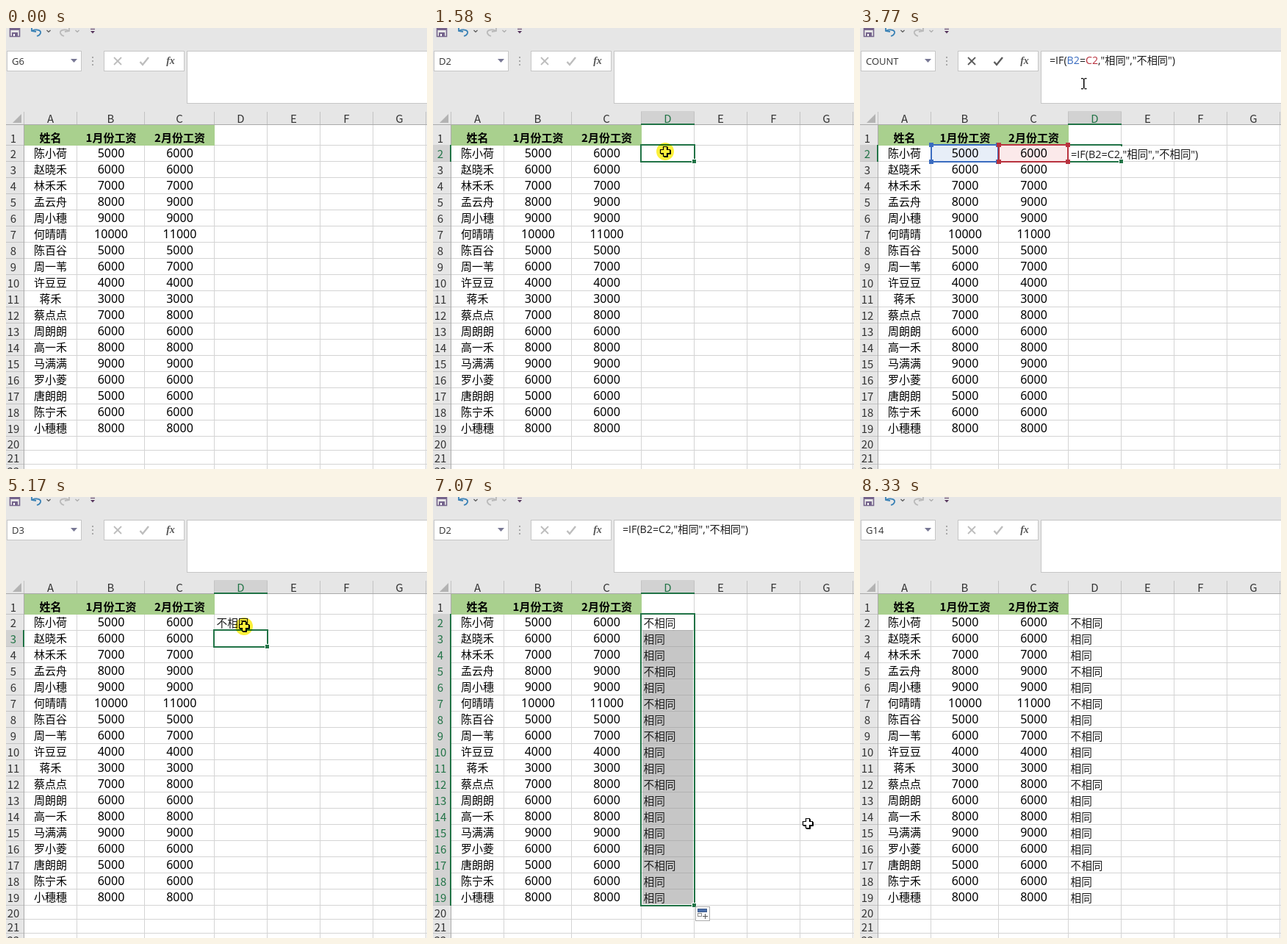
Write an HTML page with a canvas that moves like this. It is 573 by 600 pixels and loops after 8400 ms.

```html
<!DOCTYPE html>
<html lang="zh-CN">
<head>
<meta charset="utf-8">
<title>IF 比较两列</title>
<style>
html, body { margin: 0; width: 100%; height: 100%; overflow: hidden; background: #e6e6e6; }
canvas { display: block; }
</style>
</head>
<body>
<canvas id="stage" width="573" height="600"></canvas>
<script>
const ctx = document.getElementById('stage').getContext('2d');
const LOOP = 8400;
const GREEN = '#217346', BLUE = '#3a6cc0', RED = '#b8323e', INK = '#1c1c1c';
const CJK = '"Noto Sans CJK SC","Noto Sans CJK JP","Noto Sans CJK",sans-serif';
const LATIN = '"Open Sans","Noto Sans",' + CJK;

const colX = [24, 96, 188, 283, 355, 427, 499, 571];
const names = ['陈小荷', '赵晓禾', '林禾禾', '孟云舟', '周小穗', '何晴晴', '陈百谷', '周一苇', '许豆豆',
  '蒋禾', '蔡点点', '周朗朗', '高一禾', '马满满', '罗小菱', '唐朗朗', '陈宁禾', '小穗穗'];
const jan = [5, 6, 7, 8, 9, 10, 5, 6, 4, 3, 7, 6, 8, 9, 6, 5, 6, 8];
const feb = [6, 6, 7, 9, 9, 11, 5, 7, 4, 3, 8, 6, 8, 9, 6, 6, 6, 8];
const formula = [['=IF(', INK], ['B2', BLUE], ['=', INK], ['C2', RED], [',"相同","不相同")', INK]];

// Pointer paths: start, end, steps, points
const moves = [
  [70, 540, 7, [[390.5, 424], [324, 150]]],
  [860, 860, 1, [[316, 168], [316, 168]]],
  [1810, 2290, 7, [[316, 168], [304, 75]]],
  [4700, 5010, 5, [[304, 75], [316, 130], [326, 193], [324, 176]]],
  [5480, 5790, 5, [[324, 176], [340, 184], [359, 195], [355, 183]]],
  [6580, 7000, 6, [[355, 183], [510, 444]]],
  [7470, 8010, 8, [[510, 444], [400, 300], [297, 203], [460, 440], [638, 734]]]
];
const clicks = [860, 1580, 1740, 2450, 5170, 6190, 6350, 7220];

const within = (t, a, b) => t >= a && t < b;
const rowTop = r => r === 1 ? 131 : r <= 20 ? 159 + 22 * (r - 2) : 555 + 19 * (r - 20);

function box(x, y, w, h, color) {
  ctx.fillStyle = color;
  ctx.fillRect(x, y, w, h);
}

function frame(x, y, w, h, fill, line) {
  box(x, y, w, h, line);
  box(x + 1, y + 1, w - 2, h - 2, fill);
}

function text(str, x, y, font, color = '#000', align = 'center') {
  ctx.font = font;
  ctx.fillStyle = color;
  ctx.textAlign = align;
  ctx.fillText(str, x, y);
}

function shape(points, fill, line, width = 1) {
  ctx.beginPath();
  points.forEach(p => ctx.lineTo(p[0], p[1]));
  ctx.closePath();
  if (fill) { ctx.fillStyle = fill; ctx.fill(); }
  if (line) { ctx.strokeStyle = line; ctx.lineWidth = width; ctx.stroke(); }
}

function stroke(points, color, width) {
  ctx.beginPath();
  points.forEach(p => ctx.lineTo(p[0], p[1]));
  ctx.strokeStyle = color;
  ctx.lineWidth = width;
  ctx.stroke();
}

function stateAt(t) {
  const s = { name: 'G6', sel: null };
  if (t >= 860) s.sel = [6, 6, 6];
  if (t >= 1580) { s.name = 'D2'; s.sel = [3, 2, 2]; }
  s.edit = within(t, 1740, 4150);
  s.noUndo = within(t, 1740, 3230);
  s.typed = within(t, 3230, 4150);
  if (s.typed) s.name = 'COUNT';
  if (t >= 4150) { s.name = 'D3'; s.sel = [3, 3, 3]; s.results = 1; }
  if (t >= 5250) { s.name = 'D2'; s.sel = [3, 2, 2]; }
  if (t >= 6430) { s.sel = [3, 2, 19]; s.results = 18; }
  if (t >= 7220) { s.name = 'G14'; s.sel = [6, 14, 14]; }
  if (t >= 8330) s.sel = null;
  s.formula = s.typed || within(t, 5250, 7220);
  s.options = within(t, 6430, 8330);
  return s;
}

function curvedArrow(x, dir, color) {
  ctx.save();
  ctx.translate(x, 0);
  ctx.scale(dir, 1);
  ctx.beginPath();
  ctx.moveTo(-5, 3.5);
  ctx.bezierCurveTo(1, 1, 7, 3, 6, 7);
  ctx.quadraticCurveTo(5, 10, 1, 11);
  ctx.strokeStyle = color;
  ctx.lineWidth = 1.8;
  ctx.stroke();
  stroke([[-6, -2], [-6, 4], [0, 5]], color, 1.8);
  ctx.restore();
}

function toolbar(s) {
  box(0, 0, 573, 113, '#e6e6e6');
  const plum = '#75648c';
  stroke([[5.5, 0], [5.5, 11.5], [18.5, 11.5], [18.5, 0]], plum, 1.6);
  box(6, 0, 12, 3, plum);
  box(8, 6, 8, 6, plum);
  box(10, 8, 2, 3, '#fff');
  curvedArrow(41, 1, s.noUndo ? '#b3b3b3' : '#3981b5');
  curvedArrow(80, -1, '#b9b9b9');
  stroke([[55.5, 3], [58, 5.5], [60.5, 3]], s.noUndo ? '#aaa' : '#555', 1.2);
  stroke([[94.5, 3], [97, 5.5], [99.5, 3]], '#aaa', 1.2);
  box(115, 1, 6, 1, '#5a3a60');
  shape([[115, 4], [121, 4], [118, 7.5]], '#5a3a60');

  const edge = '#c6c6c6';
  frame(1, 31, 102, 28, '#fff', edge);
  text(s.name, 8, 50, '13px ' + LATIN, '#333', 'left');
  shape([[88, 42], [97, 42], [92.5, 47]], '#777794');
  [40, 45, 50].forEach(y => box(117, y - 1, 2, 2, '#a6a6a6'));
  frame(133, 31, 110, 28, '#fff', edge);
  const mark = s.edit ? '#5c5c5c' : '#bdbdbd';
  stroke([[147, 40], [157, 50]], mark, 1.8);
  stroke([[157, 40], [147, 50]], mark, 1.8);
  stroke([[182.5, 46], [186, 50], [194, 40]], mark, 2.4);
  text('fx', 224, 49, 'italic bold 14px "Liberation Serif",serif', '#555');
  frame(246, 31, 330, 72, '#fff', edge);

  if (s.formula) {
    let x = 258;
    formula.forEach(([part, color]) => {
      text(part, x, 49, '14.2px ' + LATIN, s.typed ? color : INK, 'left');
      x += ctx.measureText(part).width;
    });
  }
}

function headers(s) {
  const font = '15px ' + CJK, edge = '#c3c3c3';
  box(0, 113, 573, 19, '#e6e6e6');
  box(0, 131, 24, 469, '#e6e6e6');
  for (let c = 0; c < 7; c++) {
    const x = colX[c], w = colX[c + 1] - x, on = s.sel && s.sel[0] === c;
    if (on) box(x, 113, w + 1, 18, '#d2d2d2');
    box(x, 114, 1, 17, edge);
    text('ABCDEFG'[c], x + w / 2 + .5, 129, font, on ? GREEN : '#333');
  }
  box(571, 114, 1, 17, edge);
  box(0, 131, 573, 1, '#aaa');
  for (let r = 1; r <= 22; r++) {
    const y = rowTop(r), h = rowTop(r + 1) - y;
    const on = s.sel && r >= s.sel[1] && r <= s.sel[2];
    if (on) box(0, y, 24, h, '#d2d2d2');
    box(0, y + h, 24, 1, edge);
    text(r, 10, r === 1 ? 156 : y + (r > 21 ? 16 : r > 19 ? 17 : 18), font, on ? GREEN : '#333');
  }
  box(24, 131, 1, 469, '#aaa');
  if (s.sel) {
    const [c, a, b] = s.sel;
    box(colX[c], 130, colX[c + 1] - colX[c] + 1, 2, GREEN);
    box(23, rowTop(a), 2, rowTop(b + 1) - rowTop(a) + 1, GREEN);
  }
  shape([[21, 117], [21, 129], [9, 129]], '#b3b3b3');
}

function sheet(s) {
  const grid = '#d4d4d4', multi = s.sel && s.sel[2] > s.sel[1];
  box(24, 131, 549, 469, '#fff');
  if (multi) box(285, 182, 69, 372, '#c6c6c6');
  for (let r = 2; r <= 22; r++) box(25, rowTop(r), 548, 1, grid);
  colX.slice(1).forEach(x => box(x, 132, 1, 468, grid));
  if (multi) for (let r = 3; r < 20; r++) box(285, rowTop(r), 69, 1, '#b2b2b2');
  box(25, 132, 259, 28, '#a9d08e');
  if (s.typed) {
    box(97, 160, 91, 21, '#e7eef8');
    box(189, 160, 94, 21, '#fbe9ea');
  }

  const mid = [60.5, 143, 236.5];
  ['姓名', '1月份工资', '2月份工资'].forEach((h, i) => text(h, mid[i], 155, 'bold 15px ' + CJK));
  names.forEach((name, i) => {
    const y = rowTop(i + 2) + 17;
    text(name, mid[0], y, '15px ' + CJK);
    text(jan[i] * 1000, mid[1], y, '16px "Noto Sans",' + LATIN);
    text(feb[i] * 1000, mid[2], y, '16px "Noto Sans",' + LATIN);
    if (i < s.results) text(jan[i] === feb[i] ? '相同' : '不相同', 286.5, y + 1, '14.67px ' + CJK, INK, 'left');
  });
}

function handles(x, y, w, h, color) {
  ctx.strokeStyle = color;
  ctx.lineWidth = 2;
  ctx.strokeRect(x, y, w, h);
  [x, x + w].forEach(px => [y, y + h].forEach(py => box(px - 3, py - 3, 6, 6, color)));
}

function selection(s) {
  if (!s.sel) return;
  const [c, a, b] = s.sel;
  const x = colX[c], y = rowTop(a), r = colX[c + 1] + 1, bottom = rowTop(b + 1) + 1;
  ctx.strokeStyle = GREEN;
  ctx.lineWidth = 2;
  ctx.strokeRect(x, y, r - x, bottom - y);
  if (s.typed) {
    box(285, 161, 177, 20, '#fff');
    text(formula.map(f => f[0]).join(''), 287, 176.5, '14.4px ' + LATIN, INK, 'left');
    handles(97, 159, 91, 23, BLUE);
    handles(189, 159, 94, 23, RED);
  }
  box(r - 4, bottom - 4, 7, 7, '#fff');
  box(r - 3, bottom - 3, 5, 5, GREEN);
}

function optionsButton() {
  frame(357, 557, 20, 20, '#fff', '#ababab');
  frame(360, 560, 13, 5, '#4a6ea9', '#3d5a8a');
  frame(360, 566, 6, 5, '#fff', '#8a8a8a');
  box(367, 570, 7, 1, '#555');
  box(370, 567, 1, 7, '#555');
}

function caret(t) {
  const show = (x, y, h, alpha) => {
    ctx.globalAlpha = alpha;
    box(x, y, 1, h, '#000');
    ctx.globalAlpha = 1;
  };
  const fade = (from, gap) => t < from ? 1 : Math.max(0, .6 - .3 * Math.floor((t - from) / gap));
  if (within(t, 1740, 2450)) show(287, 163, 17, 1);
  if (within(t, 2450, 3000)) show(258, 35, 18, fade(2830, 85));
  if (within(t, 3230, 3770)) show(430, 35, 18, fade(3610, 80));
}

function pointerAt(t) {
  const move = moves.filter(m => t >= m[0]).pop();
  if (!move) return null;
  const [start, end, n, pts] = move;
  const gap = (end - start) / Math.max(1, n - 1);
  const k = gap ? Math.min(n, Math.floor((t - start) / gap + 1e-6) + 1) : n;
  const pos = k / n * (pts.length - 1);
  const i = Math.min(pts.length - 2, Math.floor(pos)), f = pos - i;
  return [0, 1].map(j => Math.round(pts[i][j] + (pts[i + 1][j] - pts[i][j]) * f));
}

function pointer(t) {
  const p = pointerAt(t);
  if (!p || within(t, 3230, 3690)) return;
  ctx.save();
  ctx.translate(p[0], p[1]);
  if (p[1] < 103) {
    box(0, -6, 1.5, 13, '#000');
    [-7, 7].forEach(y => {
      box(-3, y, 3, 1.3, '#000');
      box(1.5, y, 3, 1.3, '#000');
    });
  } else if (within(t, 5790, 6580)) {
    box(-6, -1, 13, 2, '#000');
    box(-1, -6, 2, 13, '#000');
  } else {
    const a = 2.5, b = 6.5;
    const plus = [[-a, -b], [a, -b], [a, -a], [b, -a], [b, a], [a, a],
      [a, b], [-a, b], [-a, a], [-b, a], [-b, -a], [-a, -a]];
    shape(plus.map(q => [q[0] + 1, q[1] + 1]), '#000', '#000', 1);
    shape(plus, '#fff', '#000', 1.2);
  }
  if (clicks.some(c => within(t, c, c + (c === 860 ? 90 : 80)))) {
    ctx.globalCompositeOperation = 'multiply';
    ctx.beginPath();
    ctx.arc(0, 0, 12, 0, Math.PI * 2);
    ctx.fillStyle = '#fbf03a';
    ctx.fill();
  }
  ctx.restore();
}

function draw(t) {
  const s = stateAt(t);
  sheet(s);
  toolbar(s);
  headers(s);
  selection(s);
  if (s.options) optionsButton();
  caret(t);
  pointer(t);
}

function tick() {
  draw(performance.now() % LOOP);
  requestAnimationFrame(tick);
}
tick();
</script>
</body>
</html>
```
